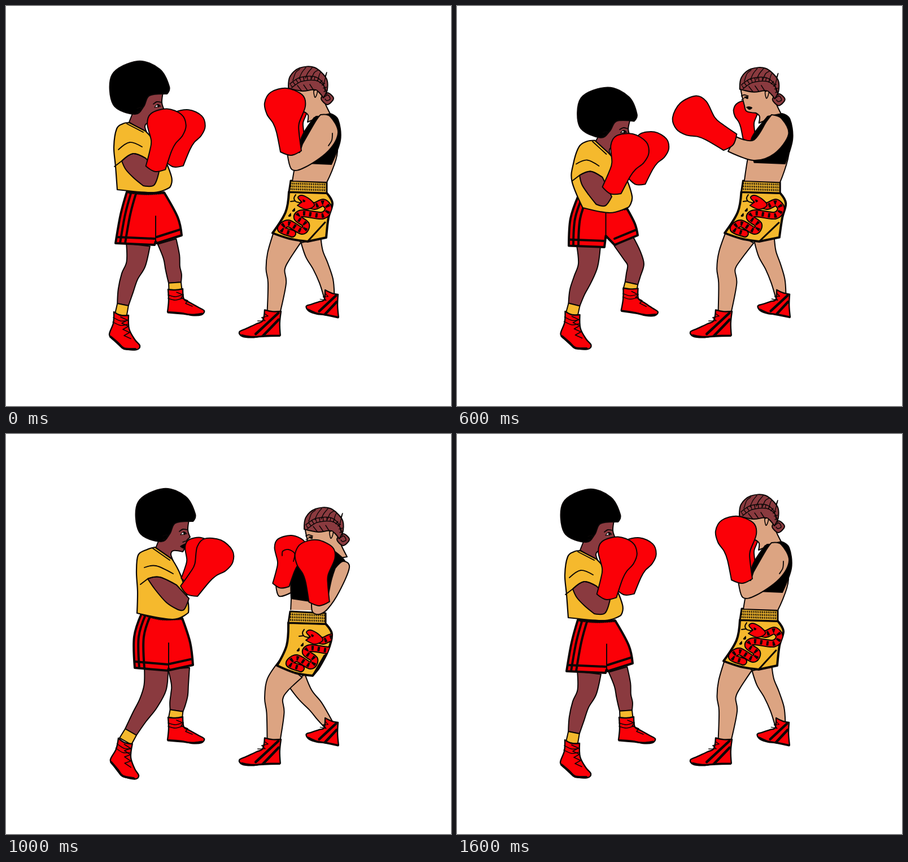
Animation, 788 px wide and 710 px high, one loop 1.8 s. Source, as an HTML page:

```html
<!DOCTYPE html>
<html lang="en">
<head>
<meta charset="utf-8">
<title>Sparring</title>
<style>
  html, body { margin: 0; width: 100%; height: 100%; overflow: hidden; background: #fff; }
  svg { display: block; width: 100%; height: 100%; }
  path { vector-effect: non-scaling-stroke; }
</style>
</head>
<body>
<svg id="stage" viewBox="0 0 788 710" stroke="#0a0606" stroke-linejoin="round" stroke-linecap="round"></svg>
<script>
const RED = '#fb0007', GOLD = '#f5b92d', DARK = '#8a3a3f', TAN = '#dca482', INK = '#000', NONE = 'none';
const GUARD = 0, SLIP = 1, COVER = 2;
const stage = document.getElementById('stage');
const times = (n, f) => Array.from({ length: n }, (_, i) => f(i));

// ---------- geometry ----------
// A shape is a list of key points "x,y" (limbs: "x,y,width"); "!" marks a corner.
const point = (x, y, w = 0, hard = false) => ({ x, y, w, hard });
const read = s => s.split(' ').map(k => point(...k.split(',').map(parseFloat), ...(k.split(',')[2] ? [] : [0]), k.endsWith('!')));
const lerp = (a, b, t) => a + (b - a) * t;

// A state blends two poses: { a, b, t }. Variants are listed in pose order.
const pick = (v, s) => [v[s.a] || v[0], v[s.b] || v[0]];
const nums = (v, s) => { const [a, b] = pick(v, s); return a.map((n, i) => lerp(n, b[i], s.t)); };
const keys = (v, s) => {
  const [a, b] = pick(v, s).map(read);
  return a.map((p, i) => point(lerp(p.x, b[i].x, s.t), lerp(p.y, b[i].y, s.t), lerp(p.w, b[i].w, s.t), p.hard));
};
const shift = (pts, dx, dy) => pts.map(p => point(p.x + dx, p.y + dy, p.w, p.hard));

function curve(p, closed) {
  const n = p.length;
  const at = i => closed ? p[(i + n) % n] : p[Math.max(0, Math.min(n - 1, i))];
  const handle = (i, sign) => {
    const q = at(i), k = q.hard ? 0 : sign / 6;
    return `${q.x + (at(i + 1).x - at(i - 1).x) * k} ${q.y + (at(i + 1).y - at(i - 1).y) * k}`;
  };
  return `M${p[0].x} ${p[0].y}` + times(closed ? n : n - 1, i =>
    `C${handle(i, 1)} ${handle(i + 1, -1)} ${at(i + 1).x} ${at(i + 1).y}`).join('') + (closed ? 'Z' : '');
}

// ---------- drawing ----------
const path = (d, fill, width, more = '') => `<path d="${d}" fill="${fill}" stroke-width="${width}" ${more}/>`;
const area = (pts, fill, width = 2.2) => path(curve(pts, true), fill, width);
const line = (pts, width = 1.8) => path(curve(pts, false), NONE, width);
const stroke = (s, width) => line(read(s), width);
const dashes = (d, width, dash) => path(d, NONE, width, `stroke-dasharray="${dash}" stroke-linecap="butt"`);
const group = (move, ...body) => `<g transform="${move}">${body.join('')}</g>`;
const clip = (id, pts, ...body) =>
  `<clipPath id="${id}"><path d="${curve(pts, true)}"/></clipPath><g clip-path="url(#${id})">${body.join('')}</g>`;

// Outline of a limb from its centre line and widths.
function limb(pts, fill) {
  const side = sign => pts.map((p, i) => {
    const q = pts[Math.max(0, i - 1)], r = pts[Math.min(pts.length - 1, i + 1)];
    const dx = r.x - q.x, dy = r.y - q.y, k = sign * p.w / 2 / Math.hypot(dx, dy);
    return point(p.x - dy * k, p.y + dx * k, 0, q === p || r === p);
  });
  return area([...side(1), ...side(-1).reverse()], fill, 2);
}

function sock(leg, size) {
  const [p, q] = leg.slice(-2), k = size / Math.hypot(q.x - p.x, q.y - p.y);
  return limb([q, point(q.x + (q.x - p.x) * k, q.y + (q.y - p.y) * k, q.w + 1)], GOLD);
}

const mitten = read('8,-116 -20,-104 -25,-84 -14,-54 -14,-36 -18,-5! 0,3 19,-3! 26,-38 32,-54 43,-70 47,-90 36,-109');
const glove = ([x, y, turn, size], flip = 1) =>
  group(`translate(${x} ${y}) rotate(${turn}) scale(${size * flip} ${size})`, area(mitten, RED, 2));

const fist = area(read('350,187 332,197 338,215 346,243! 365,244 375,228! 408,229 441,232! 449,195! 415,185 400,189 375,185'), RED) +
  stroke('348,224 350,216 358,215 352,222 361,227 376,227');

const laces = times(6, i => `${15 + 4 * i + 8 * (i % 2)},${5 + 5 * i}!`).join(' ');
const cuffs = stroke('0,10 13,13 27,9', 1.5) + stroke('0,16 13,19 27,15', 1.5) + stroke(laces, 1.6);
const stripes = stroke('4,3 38,40', 4.5) + stroke('3,14 26,42', 4.5) + stroke('26,5! 20,9! 30,12! 24,17! 36,18!', 1.4);
const boot = (x, y, move, trim) => group(`translate(${x} ${y}) ${move}`,
  area(read('0,0! 13,1 26,-1! 28,17 38,23 54,32 64,38 59,45 42,46 24,42 -1,40! 1,20'), RED, 2.4),
  stroke('0,41 24,43 44,45 60,43', 3), trim);
const frontBoot = (x, y, turn) => group(`translate(${x} ${y}) rotate(${turn})`,
  area(read('0,0! 12,6 26,6! 27,30 37,49 46,60 40,67 18,65 0,50 -8,40 -1,20'), RED, 2.4),
  stroke('-6,44 8,56 18,65 38,66', 4),
  stroke('-1,10 12,16 25,15', 1.5), stroke('-2,18 12,24 24,22', 1.5),
  stroke(times(8, i => `${12 + 11 * (i % 2) + i},${9 + 5.5 * i}!`).join(' '), 1.7));

// ---------- left boxer ----------
const L = {
  rear: ['285,418,34 293,445,29 295,464,26 298,478,26 299,491,22', '304,415,40 327,440,36 338,454,32 327,475,25 319,493,24', '306,416,38 308,445,30 307,462,30 304,478,28 302,491,23'],
  front: ['234,424,42 230,458,34 219,480,30 212,505,27 207,530,20', '232,428,42 234,462,35 226,490,34 214,510,28 208,530,21', '266,416,42 264,450,40 252,478,34 236,503,28 221,529,23'],
  rearBoot: [[287, 503, 0], [302, 498, 8]],
  frontBoot: [[191, 543, 0], [192, 541, 0], [199, 540, 9]],
  shorts: ['214,330! 247,333 280,331! 304,375 311,407! 267,421! 265,418! 263,424! 194,421! 203,370', '216,343! 260,385 322,388! 326,398 329,407! 291,427! 262,398! 259,432! 202,430! 199,385', '240,319! 275,328 312,327! 326,370 331,410! 290,419! 288,416! 287,420! 228,415! 227,360'],
  shirt: ['218,207! 247,222! 272,253 293,303 290,322! 262,331 197,326! 194,285 191,250 196,218 207,209', '270,270! 290,300! 316,334 327,372 318,392! 280,403 248,390! 213,337 221,310 236,282 252,272', '264,201! 294,222! 309,250 322,295 323,317! 295,329 232,318! 233,280 231,245 234,215 250,205'],
  arm: ['205,275! 225,262 247,270! 271,294! 262,318 243,319! 226,305 212,290', '229,326! 248,325 268,338! 277,383! 263,391 250,385! 241,366 231,345', '251,257! 272,254 302,268! 324,292! 315,312 303,311! 284,299 264,276'],
  head: [[236, 146, 0, 1], [295, 235, 10, .91], [282, 145, 0, 1]],
  far: [[297, 283, 11, .88], [338, 346, 20, .78], [322, 262, 12, .7]],
  near: [[264, 291, 7, .95], [281, 370, 26, .95], [322, 282, 28, .95]]
};
// Head parts are relative to the middle of the hair.
const face = area(read('-10,40! -18,60! 14,80! 10,68 15,62 31,64! 36,55 38,48! 38,44 44,38! 40,25 42,8! 18,3 3,20'), DARK, 2);
const hair = area(read('-3,-48 36,-34 53,-3 49,10! 18,13 8,32 -8,46 -46,29 -48,-24'), INK) +
  stroke('25,28 31,24 39,25') + area(read('27,34! 32,29 38,32!'), '#fff', 1.2) + area(read('32,29 36,30 34,34'), INK, 1) +
  area(read('27,54 37,49! 35,58 30,57'), INK, 1) + stroke('36,45 31,47', 1.5) + stroke('-4,36 3,34 2,41 -4,42', 1.5);

function leftShorts(s) {
  const p = keys(L.shorts, s), seam = [p[0], p[9], p[8]];
  const hem = q => line(shift(q, 0, -11), 4);
  return area(p, RED, 4) + clip('cutL', p, hem(p.slice(4, 6)), hem(p.slice(7, 9)),
    line(shift(seam, 8, 0), 4), line(shift(seam, 17, 0), 4), line([shift([p[6]], 0, -45)[0], p[6]], 2)) +
    dashes(curve(shift(p.slice(0, 3), 0, 1), false), 4, '1.5 2');
}

function left(s, foot = s, jab = false) {
  const rear = keys(L.rear, s), front = keys(L.front, foot);
  const [rx, ry, turn] = nums(L.rearBoot, s), [hx, hy, tilt, squash] = nums(L.head, s);
  const head = `translate(${hx} ${hy}) rotate(${tilt}) scale(1 ${squash})`;
  const shirt = keys(L.shirt, s), arm = keys(L.arm, s), cuff = arm.slice(0, 3);
  const sleeve = line(shift(cuff, -6, -20)) + line([shift(cuff, -13, 10)[0], ...cuff], 2);
  const body = group(head, face) + area(shirt, GOLD) + line(shift(shirt.slice(0, 2), -4, 2)) + group(head, hair);
  const legs = limb(rear, DARK) + sock(rear, 14) + boot(rx, ry, `rotate(${turn})`, cuffs) +
    group(jab ? 'rotate(2 240 600)' : '', limb(front, DARK), sock(front, 19), frontBoot(...nums(L.frontBoot, foot))) +
    leftShorts(s);
  const near = glove(nums(L.near, s));
  return legs + (jab
    ? group('rotate(5 280 325)', body, group('translate(-14 0)', near)) +
      limb(read('264,258,30 310,252,27 355,243,27'), DARK) + group('translate(795 25) scale(-1 1)', fist)
    : body + area(arm, DARK, 2) + sleeve + glove(nums(L.far, s)) + near);
}

// ---------- right boxer ----------
const R = {
  rear: ['540,416,36 546,440,32 557,462,28 567,488,25 572,514,19', '552,412,36 556,440,32 564,462,28 571,488,25 575,514,19', '514,436,36 530,463,28 548,483,25 560,500,22 570,514,18'],
  front: ['499,408,52 482,445,40 477,468,33 480,492,32 474,543,23', '507,408,56 484,442,42 475,466,31 478,492,32 474,543,23', '505,416,50 481,445,42 474,470,32 477,495,31 474,543,23'],
  shorts: ['501,330! 568,332! 578,350 571,376 567,411! 534,418! 502,413 472,403! 495,366', '508,330! 580,332! 590,350 585,378 578,410! 537,418! 507,413 478,403! 501,366', '500,335! 566,337! 577,355 570,385 553,417! 543,429! 512,424 480,411! 497,375'],
  torso: ['549,196! 522,240 507,311! 568,313! 587,258 574,195!', '552,196! 522,240 512,311! 579,314! 590,255 576,195!', '508,226! 506,270 504,316! 567,320! 572,270 575,210!'],
  vest: ['546,198! 522,238 531,279! 576,281! 592,238 588,202 574,191!', '560,192! 519,235 518,275! 590,278! 598,235 592,199 578,191!', '540,210! 508,230 505,292! 545,298! 590,270 602,230 578,206!'],
  rearBoot: [[588, 512], [591, 511]],
  head: [[0, 0], [2, 5], [28, 23]],
  snake: [[0, 0], [8, 0], [15, 12]]
};

// Braids: a twisted band with strands fanning up to the edge of the hair.
const band = '503,138 520,127 545,125 560,135 565,150';
const strand = i => {
  const x = 508 + 11 * i, end = Math.min(x + 12, 565);
  return stroke(`${x},${128 + (i - 2) ** 2} ${x + 5},118 ${end},${140 - 31 * Math.sqrt(1 - ((end - 535) / 34) ** 2)}`, 1.4);
};
const rightHead =
  area(read('501,142! 504,158 508,174 512,185 528,188! 535,194 534,206! 550,200 576,195! 566,175 560,158! 545,138'), TAN, 2) +
  area(read('558,164 569,154 580,164 569,175'), DARK, 2) + stroke('563,162 570,158 574,165 568,168 565,165', 1.5) +
  area(read('500,146! 503,125 520,110 546,109 567,128 569,148 562,163! 548,149 525,151'), DARK, 2) +
  stroke(band, 1.5) + group('translate(3 7)', stroke(band, 1.5)) +
  group('translate(1.5 3.5)', dashes(curve(read(band), false), 7, '1.4 5')) +
  times(6, strand).join('') + times(3, i => stroke(`${516 + 11 * i},${141 - i} ${523 + 11 * i},150`, 1.4)).join('') +
  area(read('545,151 551,150 550,158 547,162'), TAN, 1.6) +
  stroke('503,158 508,156 515,158') + area(read('508,160 514,159 514,163'), INK, 1) + stroke('508,162 503,165', 1.4) +
  area(read('512,178 517,177 522,179 517,182'), INK, 1);

const spine = curve(read('528,349 546,355 562,349 571,360 560,372 525,368 516,376 531,388 524,399 500,386 487,396 507,404'), false);
const tube = (color, width) => path(spine, NONE, width, `stroke="${color}"`);
const drop = (x, y) => area(read(`${x},${y} ${x},${y + 5} ${x - 4},${y + 5}`), INK, 1);
const snake = tube(INK, 14) + tube(RED, 10) + dashes(spine, 8, '4 7') +
  area(read('516,354! 524,348! 517,340 524,336 538,343 546,354 532,361'), RED, 2) + area(read('526,344 530,346 527,348'), INK, 1) +
  stroke('520,349 513,347 510,341 513,335', 2) + stroke('512,346 504,347', 2) + drop(511, 359) + drop(504, 368);

function rightShorts(s) {
  const p = keys(R.shorts, s), [l, r] = p;
  const belt = [l, r, ...shift([r], 0, -19), ...shift([l], 3, -20)].map(q => point(q.x, q.y, 0, true));
  const weave = times(3, i => dashes(`M${l.x + 3} ${l.y - 5 - 5 * i}L${r.x - 2} ${r.y - 5 - 5 * i}`, 3.6, '1.7 1.6'));
  return area(p, GOLD, 4) + clip('cutR', p, group(`translate(${nums(R.snake, s)})`, snake)) +
    line([p[5], ...shift([p[3]], -6, 8)], 3) + area(belt, GOLD, 3) + weave.join('');
}

const guardArm = area(read('557,193! 574,196 588,225 570,258 530,286 506,290 498,260! 520,260! 525,245! 548,205'), TAN, 2) +
  stroke('578,226 577,238 571,248');
const reaches = {
  guard: () => guardArm + glove([505, 262, 0, 1], -1),
  load: () => area(read('557,193! 575,200 587,228 562,262 525,274 480,258! 494,232! 525,238 548,205'), TAN, 2) +
    glove([487, 244, -48, 1], -1),
  punch: () => area(read('449,203! 505,203 552,190! 570,203 576,240! 547,261! 528,236 500,231 447,229!'), TAN, 2) +
    area(read('543,262! 560,257 575,244! 572,256 560,264'), GOLD, 2) + fist,
  cover: () => area(read('583,238! 597,226 608,237 590,280 570,310 555,320 543,316 541,300! 570,290! 576,260'), TAN, 2) +
    glove([486, 271, 8, .8]) + stroke('489,216 490,208 500,205 511,212 509,226') + glove([555, 302, 2, .98], -1)
};

function right(s, reach, sway = 0) {
  const [bx, by] = nums(R.rearBoot, s), cover = reach === 'cover';
  const behind = cover ? area(read('478,268! 484,288 508,280! 512,235!'), TAN, 2) : glove([518, 238, 0, .6], -1);
  return limb(keys(R.rear, s), TAN) + boot(bx, by, 'scale(-.88 1) skewY(-15)', stripes) +
    limb(keys(R.front, s), TAN) + boot(487, 542, 'scale(-1.12 1.06) rotate(-3)', stripes) + rightShorts(s) +
    group(`rotate(${sway} 530 330)`, behind, group(`translate(${nums(R.head, s)})`, rightHead),
      clip('waist', read('440,80! 640,80! 640,315! 440,311!'), area(keys(R.torso, s), TAN, 2)),
      area(keys(R.vest, s), INK), reaches[reach]());
}

// ---------- timeline ----------
const STEP = 200;
const still = pose => ({ a: pose, b: pose, t: 0 });
const toward = t => ({ a: GUARD, b: SLIP, t });
const guard = () => right(still(GUARD), 'guard') + left(still(GUARD));
const cover = () => right(still(COVER), 'cover') + left(still(COVER));
const steps = [
  guard,
  () => right(toward(.35), 'load') + left(toward(.55), toward(1)),
  () => right(still(SLIP), 'punch') + left(still(SLIP)),
  () => right(toward(.35), 'load') + left(toward(.5)),
  guard,
  cover,
  () => right(still(COVER), 'cover', -3) + left(still(COVER), still(COVER), true),
  cover,
  guard
];

let shown = -1;
const start = performance.now();
function tick(now) {
  const i = Math.floor(Math.max(0, now - start) / STEP) % steps.length;
  if (i !== shown) {
    stage.innerHTML = steps[i]();
    shown = i;
  }
  requestAnimationFrame(tick);
}
tick(start);
</script>
</body>
</html>
```
